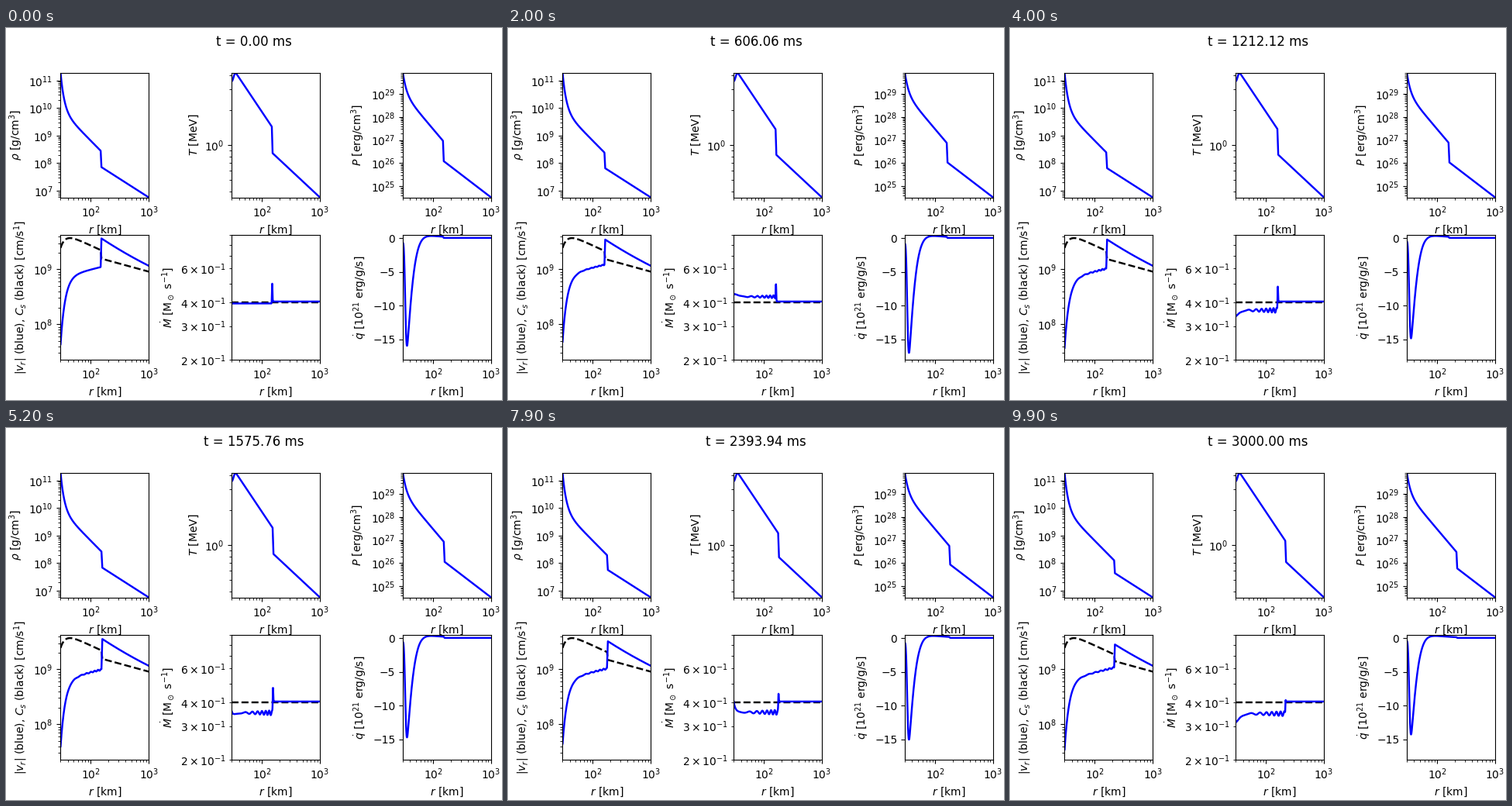
Write a matplotlib script that moves like this. It is 640 by 480 pixels and loops after 10000 ms.

```python
import numpy as np
import matplotlib.pyplot as plt
from matplotlib.animation import FuncAnimation

FRAMES, T_END = 100, 3000.0
R_MIN, R_MAX = 30.0, 1000.0
X_END = np.log10(R_MAX / R_MIN)
PIXEL = X_END / 114            # width of one pixel in dex

x = np.linspace(0, X_END, 700)
r = R_MIN * 10 ** x
e = X_END - x

# Shock history: time (ms), mean radius (km), phase of the pulsation (cycles)
t_key = [0, 606, 1212, 1576, 2061, 2697, 3000]
r_key = [150, 163.5, 154, 155, 176, 195.5, 210]
c_key = [.75, 7.05, 13.6, 17.5, 22.42, 28.1, 30.6]

# log10 profiles (behind the shock, ahead of the shock)
profiles = {
    "rho": (9.923 + 1.362 * np.exp(-x / .066) - 2.125 * x, 6.76 + 1.344 * e),
    "temp": (.673 - .743 * x - .121 * np.exp(-(x / .04) ** 2), -.449 + .4645 * e),
    "pres": (29.02 + .9 * np.exp(-x / .064) - 2.96 * x, 24.52 + 1.92 * e),
    "vel": (8.866 + .263 * x - 1.22 * np.exp(-x / .079), 9.064 + .53 * e + .097 * e ** 2),
    "cs": (9.686 - .484 * x - .296 * np.exp(-x / .08), 8.958 + .289 * e),
}
heating = 1.36 * 10 ** (-1.1 * x)
cooling = 25.8 * np.exp(-17.8 * x ** 1.5) * (1 - .92 * np.exp(-(x / .05) ** 2.8))

panels = [
    ("rho", r"$\rho$ [g/cm$^3$]", (10 ** 6.76, 10 ** 11.285)),
    ("temp", r"$T$ [MeV]", (10 ** -.449, 10 ** .622)),
    ("pres", r"$P$ [erg/cm$^3$]", (10 ** 24.52, 10 ** 29.92)),
    ("vel", r"$|v_r|$ (blue), $C_s$ (black) [cm/s$^1$]", (10 ** 7.357, 10 ** 9.627)),
    ("mdot", r"$\dot{M}$ [M$_\odot$ s$^{-1}$]", (.2, .9)),
    ("heat", r"$\dot{q}$ [10$^{21}$ erg/g/s]", (-18, .5)),
]

fig, axes = plt.subplots(2, 3, figsize=(6.4, 4.8), dpi=100)
fig.subplots_adjust(left=.11, right=.978, bottom=.1085, top=.88, wspace=.94, hspace=.3)
title = fig.suptitle("", y=.982)

lines = {}
for ax, (name, label, lim) in zip(axes.flat, panels):
    ax.set_xscale("log")
    ax.set_xlim(R_MIN, R_MAX)
    if name != "heat":
        ax.set_yscale("log")
    ax.set_ylim(*lim)
    ax.set_xlabel(r"$r$ [km]")
    ax.set_ylabel(label)
    if name == "vel":
        lines["cs"], = ax.plot([], [], "k--", lw=1.75)
    if name == "mdot":
        ax.plot(r, np.full_like(r, .4), "k--", lw=1.75)
    lines[name], = ax.plot([], [], "b-", lw=1.75)


def flow(s, tau, cycle, amp):
    """Accretion rate behind the shock in dex; s runs from the core to the shock."""
    core = np.exp(-s / .07)
    wave = amp * (1 + .6 * core) * np.cos(2 * np.pi * (cycle - .16 * core))
    ripple = .013 * min(tau, 1) * s * np.sin(2 * np.pi * (7 * s ** 2 + cycle))
    return wave + ripple - .007


def update(k):
    t = T_END * k / (FRAMES - 1)
    tau = t / 1000
    cycle = np.interp(t, t_key, c_key)
    amp = (.03 + .012 * tau) * min(t / 300, 1)
    radius = np.interp(t, t_key, r_key) - 220 * amp * np.sin(2 * np.pi * cycle)
    xs = np.log10(radius / R_MIN)

    ahead = np.clip((x - xs) / PIXEL + .5, 0, 1)
    dex = flow(np.clip(x / xs, 0, 1), tau, cycle, amp)

    def join(inner, outer):
        return inner * (1 - ahead) + outer * ahead

    for name, (inner, outer) in profiles.items():
        if name == "vel":
            inner = inner + dex
        lines[name].set_data(r, 10 ** join(inner, outer))

    lines["heat"].set_data(r, join(heating - cooling * 10 ** (.6 * dex), .05))

    mdot = join(.4 * 10 ** dex, .403)
    spike = np.exp(-((x - xs) / (.45 * PIXEL)) ** 2)
    lines["mdot"].set_data(r, mdot + (.5 - .01 * tau ** 2 - mdot) * spike)
    title.set_text(f"t = {t:.2f} ms")
    return [title, *lines.values()]


anim = FuncAnimation(fig, update, frames=FRAMES, interval=100, repeat=True, repeat_delay=0)
plt.show()
```
